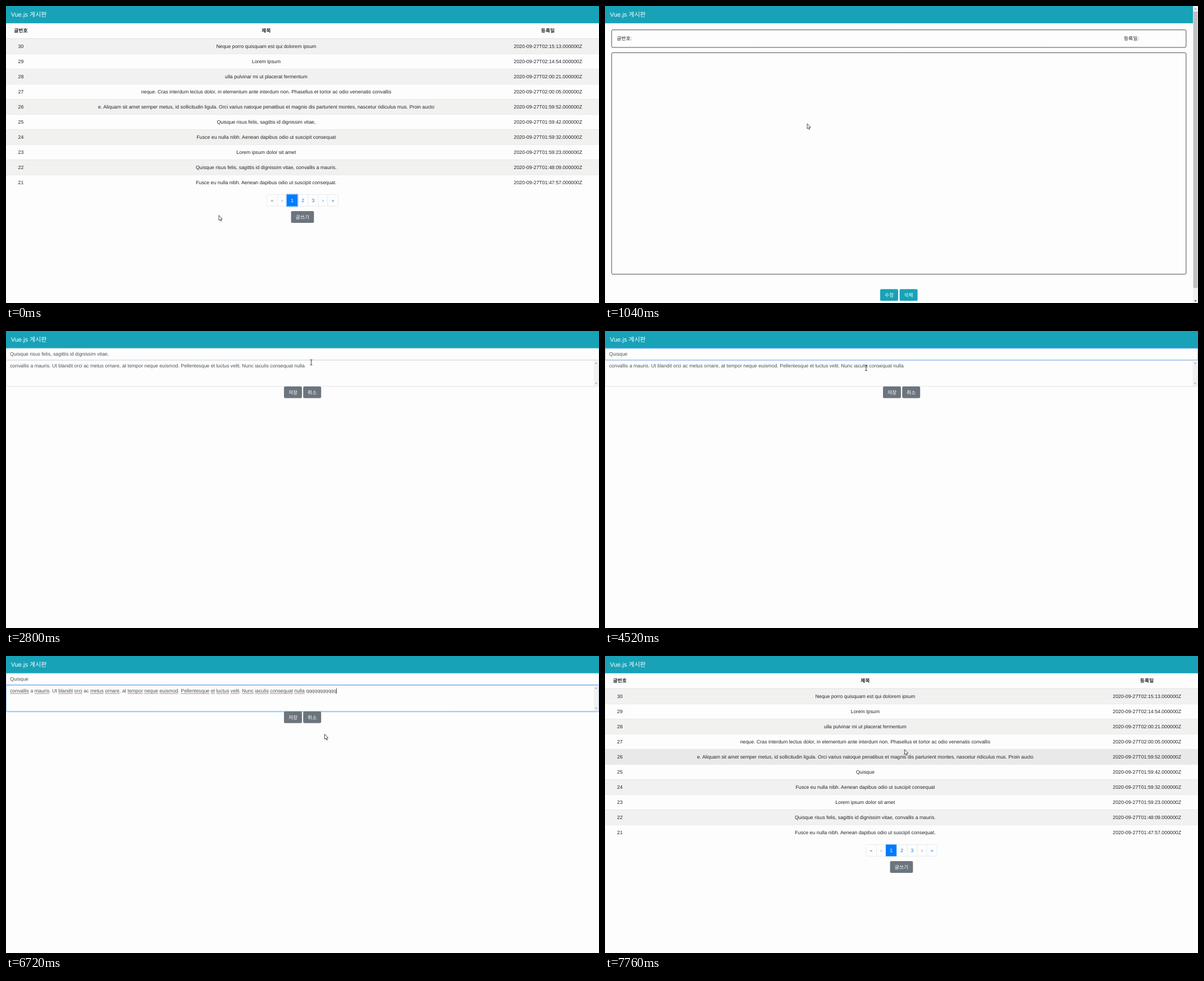
An HTML page with a canvas that plays this animation: 1056 px wide and 530 px high, repeating every 8000 ms.

```html
<!DOCTYPE html>
<html lang="ko">
<head>
<meta charset="utf-8">
<title>Vue.js 게시판</title>
<style>
html, body { margin: 0; width: 100%; height: 100%; overflow: hidden; background: #fdfdfd; }
canvas { display: block; width: 1056px; height: 530px; }
</style>
</head>
<body>
<canvas id="stage" width="1056" height="530"></canvas>
<script>
const ctx = document.getElementById('stage').getContext('2d');
const LOOP = 8000, W = 1056, H = 530;
const FAMILY = '"Liberation Sans", Arial, "Noto Sans CJK KR", "Noto Sans CJK", sans-serif';
const BG = '#fdfdfd', INFO = '#17a2b8', GRAY = '#6c757d', BLUE = '#007bff', INK = '#212529', FIELD = '#495057';
const ROW_TOP = 58.5, ROW_H = 26.95;

// Moments of the story, in ms
const OPEN = 880, LOADED = 1160, PRESS_EDIT = 1760, EDIT = 2120;
const FOCUS_TITLE = 3220, DRAG_END = 3740, DELETE = 3920;
const FOCUS_BODY = 5400, TYPE = 6290, PRESS_SAVE = 7160, SAVED = 7240, REST = 7720;

const TITLE = 'Quisque risus felis, sagittis id dignissim vitae,';
const KEPT = 'Quisque';
const BODY = 'convallis a mauris. Ut blandit orci ac metus ornare, at tempor neque euismod. ' +
  'Pellentesque et luctus velit. Nunc iaculis consequat nulla';
const POSTS = [
  ['Neque porro quisquam est qui dolorem ipsum', '02:15:13'],
  ['Lorem Ipsum', '02:14:54'],
  ['ulla pulvinar mi ut placerat fermentum', '02:00:21'],
  ['neque. Cras interdum lectus dolor, in elementum ante interdum non. Phasellus et tortor ac odio venenatis convallis', '02:00:05'],
  ['e. Aliquam sit amet semper metus, id sollicitudin ligula. Orci varius natoque penatibus et magnis dis parturient montes, nascetur ridiculus mus. Proin aucto', '01:59:52'],
  [TITLE, '01:59:42'],
  ['Fusce eu nulla nibh. Aenean dapibus odio ut suscipit consequat', '01:59:32'],
  ['Lorem ipsum dolor sit amet', '01:59:23'],
  ['Quisque risus felis, sagittis id dignissim vitae, convallis a mauris.', '01:48:09'],
  ['Fusce eu nulla nibh. Aenean dapibus odio ut suscipit consequat.', '01:47:57']
];

// Pointer stops: time, x, y
const PATH = [
  [0, 379, 373.5], [40, 379, 373.5], [760, 360, 210], [1080, 360, 210],
  [1680, 505, 513], [2140, 506, 513], [2800, 543.5, 56], [2900, 520, 50],
  [3200, 184, 42], [3260, 184, 42], [DRAG_END, 42, 42], [3960, 42, 43],
  [4520, 465, 66], [4640, 498, 74], [5000, 620, 198], [5360, 596, 63],
  [5460, 596, 63], [5740, 640, 9], [6040, 660, 198], [6280, 671, 192],
  [6380, 671, 192], [6720, 567.5, 139.5], [7080, 512, 110], [7240, 512, 110],
  [7320, 516, 111], [7560, 533.5, 167], [LOOP, 533.5, 167]
];

const clamp = v => Math.max(0, Math.min(1, v));
const ease = v => v * v * (3 - 2 * v);
const inside = (p, x0, y0, x1, y1) => p.x >= x0 && p.x < x1 && p.y >= y0 && p.y < y1;

function pointer(t) {
  const i = PATH.findIndex((p, n) => n > 0 && t <= p[0]);
  const [a, b] = [PATH[i - 1], PATH[i]];
  const k = ease((t - a[0]) / (b[0] - a[0]));
  return { x: a[1] + (b[1] - a[1]) * k, y: a[2] + (b[2] - a[2]) * k };
}

function setFont(size = 8.8, weight = '') {
  ctx.font = `${weight} ${size}px ${FAMILY}`;
}

function text(s, x, y, color = INK, align = 'left', size = 8.8, weight = '') {
  setFont(size, weight);
  ctx.textAlign = align;
  ctx.fillStyle = color;
  ctx.fillText(s, x, y);
}

function width(s) {
  setFont();
  return ctx.measureText(s).width;
}

function rect(x, y, w, h, color) {
  ctx.fillStyle = color;
  ctx.fillRect(x, y, w, h);
}

function round(x, y, w, h, r) {
  ctx.beginPath();
  ctx.roundRect(x, y, w, h, r);
}

function ring(x, y, w, h, color) {
  round(x - .9, y - .9, w + 1.8, h + 1.8, 3);
  ctx.strokeStyle = color;
  ctx.lineWidth = 1.8;
  ctx.stroke();
}

function button(label, x, y, w, color, glow) {
  if (glow) ring(x, y, w, 20.9, glow);
  round(x, y, w, 20.9, 2.2);
  ctx.fillStyle = color;
  ctx.fill();
  text(label, x + w / 2, y + 13.7, '#fff', 'center');
}

function triangle(x, y, dir, color) {
  ctx.beginPath();
  ctx.moveTo(x - 2.2, y + dir * 1.2);
  ctx.lineTo(x + 2.2, y + dir * 1.2);
  ctx.lineTo(x, y - dir * 1.2);
  ctx.fillStyle = color;
  ctx.fill();
}

function navbar(w) {
  rect(0, 0, w, 30.8, INFO);
  text('Vue.js 게시판', 8.8, 18.9, '#fff', 'left', 11);
}

function list(t, p) {
  const saved = t >= SAVED;
  navbar(W);
  [['글번호', 26.4], ['제목', 463.4], ['등록일', 965]].forEach(([s, x]) =>
    text(s, x, 47.2, INK, 'center', 8.8, 'bold'));
  const hover = Math.floor((p.y - ROW_TOP) / ROW_H);
  POSTS.forEach(([title, time], i) => {
    const y = ROW_TOP + i * ROW_H, base = y + 16.6;
    if (i === hover) rect(0, y, W, ROW_H, '#e9e9e9');
    else if (i % 2 === 0) rect(0, y, W, ROW_H, '#f1f1f0');
    rect(0, y - (i ? 0 : .8), W, i ? .6 : 1.1, '#dee2e6');
    text(String(30 - i), 26.4, base, INK, 'center');
    text(saved && title === TITLE ? KEPT : title, 463.4, base, INK, 'center');
    text(`2020-09-27T${time}.000000Z`, 965.2, base, INK, 'center');
  });
  pager(saved);
  button('글쓰기', 507.6, 366, 40.8, GRAY);
}

function pager(saved) {
  const edges = [464.5, 483.5, 500, 519.3, 538, 556, 572.8, 591.5];
  round(464.5, 336.6, 127, 20.6, 2.2);
  ctx.strokeStyle = '#dee2e6';
  ctx.lineWidth = .7;
  ctx.stroke();
  ['«', '‹', '1', '2', '3', '›', '»'].forEach((s, i) => {
    const x = edges[i], w = edges[i + 1] - x, on = i === 2;
    if (i) rect(x - .3, 336.6, .7, 20.6, '#dee2e6');
    if (on) {
      if (!saved) ring(x, 336.5, w, 20.9, 'rgba(0,123,255,.3)');
      rect(x, 336.4, w, 21, BLUE);
    }
    text(s, x + w / 2, 350, on ? '#fff' : i < 2 ? GRAY : BLUE, 'center');
  });
}

function frame(y, h) {
  round(11.8, y, 1023, h, 2.2);
  ctx.strokeStyle = '#343a40';
  ctx.lineWidth = .9;
  ctx.stroke();
}

function detail(t, p) {
  navbar(1047);
  rect(1047, 0, 9, H, '#f1f1f1');
  rect(1047.6, 10, 7.8, 493, '#c1c1c1');
  triangle(1051.5, 5, 1, '#a3a3a3');
  triangle(1051.5, 526.5, -1, '#505050');
  frame(42.6, 31.3);
  frame(83.4, 395.2);
  const ready = t >= LOADED;
  text('글번호:' + (ready ? ' 25' : ''), 21, 61, INK);
  text('등록일:' + (ready ? ' 2020-09-27' : ''), 924, 61, INK);
  if (ready) text(BODY, 21, 102, INK);
  const over = inside(p, 490, 505, 522, 526);
  button('수정', 490, 505.2, 32, over ? '#138496' : INFO, t >= PRESS_EDIT && 'rgba(23,162,184,.5)');
  button('삭제', 524.6, 505.2, 32, INFO);
}

// Focus strength of a field, with its short fade
const focus = (t, on, off) => ease(clamp((t - on) / 150)) * (1 - ease(clamp((t - off) / 150)));

function field(y, h, f) {
  round(.3, y, W - .6, h, 2.2);
  ctx.strokeStyle = '#ced4da';
  ctx.lineWidth = .7;
  ctx.stroke();
  if (f <= 0) return;
  ctx.globalAlpha = f;
  ring(.3, y, W - .6, h, 'rgba(0,123,255,.25)');
  round(.3, y, W - .6, h, 2.2);
  ctx.strokeStyle = '#80bdff';
  ctx.lineWidth = .9;
  ctx.stroke();
  ctx.globalAlpha = 1;
}

function misspell(s, x, y) {
  for (const m of s.matchAll(/[a-z]+/gi)) {
    if (m[0].length < 3 && m[0] !== 'et') continue;
    rect(x + width(s.slice(0, m.index)), y, width(m[0]), .8, 'rgba(205,35,50,.85)');
  }
}

function caret(x, y, since) {
  if (since >= 0 && since % 1000 < 500) rect(x, y, .7, 9.5, '#222');
}

function edit(t, p) {
  navbar(W);
  field(31.1, 20.4, focus(t, FOCUS_TITLE, FOCUS_BODY));
  field(52.2, 46.6, focus(t, FOCUS_BODY, LOOP));
  rect(1046.6, 52.8, 8.8, 45.4, '#f1f1f1');
  triangle(1051, 57.3, 1, '#a3a3a3');
  triangle(1051, 93.6, -1, '#a3a3a3');

  const cut = t >= DELETE;
  text(cut ? KEPT : TITLE, 7.2, 44.2, FIELD);
  if (t >= FOCUS_TITLE && !cut) {
    misspell(TITLE, 7.2, 46.2);
    const end = 7.2 + width(TITLE), start = Math.max(7.2 + width(KEPT), Math.min(end, p.x));
    if (end - start > 1) {
      ctx.save();
      ctx.beginPath();
      ctx.rect(start, 36, end - start, 10.5);
      ctx.clip();
      rect(start, 36, end - start, 10.5, '#3390ff');
      text(TITLE, 7.2, 44.2, '#fff');
      ctx.restore();
    } else caret(end, 36.5, t - FOCUS_TITLE);
  }
  if (cut && t < FOCUS_BODY) caret(7.2 + width(KEPT), 36.5, t - DELETE);

  const count = Math.floor(11 * clamp((t - TYPE) / 396));
  const body = BODY + (count ? ' ' + 'q'.repeat(count) : '');
  text(body, 7.2, 65.2, FIELD);
  if (t >= FOCUS_BODY) {
    if (t >= FOCUS_BODY + 100) misspell(BODY, 7.2, 66.6);
    caret(7.2 + width(body), 57.3, t - (t < TYPE ? FOCUS_BODY : Math.min(t, TYPE + 396)));
  }

  const over = inside(p, 495, 99, 527, 120);
  button('저장', 495, 98.9, 32, over ? '#5a6268' : GRAY, t >= PRESS_SAVE && 'rgba(108,117,125,.5)');
  button('취소', 529.2, 98.9, 32, GRAY);
}

function outline(path, x, y) {
  ctx.save();
  ctx.translate(x, y);
  const shape = new Path2D(path);
  ctx.fillStyle = '#fff';
  ctx.fill(shape);
  ctx.strokeStyle = '#222';
  ctx.lineWidth = .8;
  ctx.lineJoin = 'round';
  ctx.stroke(shape);
  ctx.restore();
}

const ARROW = 'M0 0V9L2 7.2L3.5 10.4L4.9 9.8L3.5 6.6H6.2Z';
const HAND = 'M-1 0Q0-1 1 0V4.2L4 5Q5 5.3 5 6.4V9L4 12.6H-1.2L-3.8 8.2Q-4.4 7 -3.4 6.6L-1 8Z';

function ibeam({ x, y }) {
  ctx.strokeStyle = '#333';
  ctx.lineWidth = .9;
  ctx.stroke(new Path2D(`M${x - 2} ${y - 4.6}H${x + 2}M${x} ${y - 4.6}V${y + 4.6}M${x - 2} ${y + 4.6}H${x + 2}`));
}

function cursor(t, p, page) {
  if (page === edit && p.y > 31 && p.y < 98.8) return ibeam(p);
  const hot = page === list ? p.y > ROW_TOP && p.y < ROW_TOP + 10 * ROW_H && t < REST
    : page === edit ? inside(p, 495, 99, 561, 120)
    : inside(p, 490, 505, 557, 526);
  outline(hot ? HAND : ARROW, p.x, p.y);
}

function draw() {
  const t = performance.now() % LOOP;
  const p = pointer(t);
  const page = t < OPEN || t >= SAVED ? list : t < EDIT ? detail : edit;
  ctx.textRendering = 'geometricPrecision';
  rect(0, 0, W, H, BG);
  page(t, p);
  cursor(t, p, page);
  requestAnimationFrame(draw);
}
draw();
</script>
</body>
</html>
```
